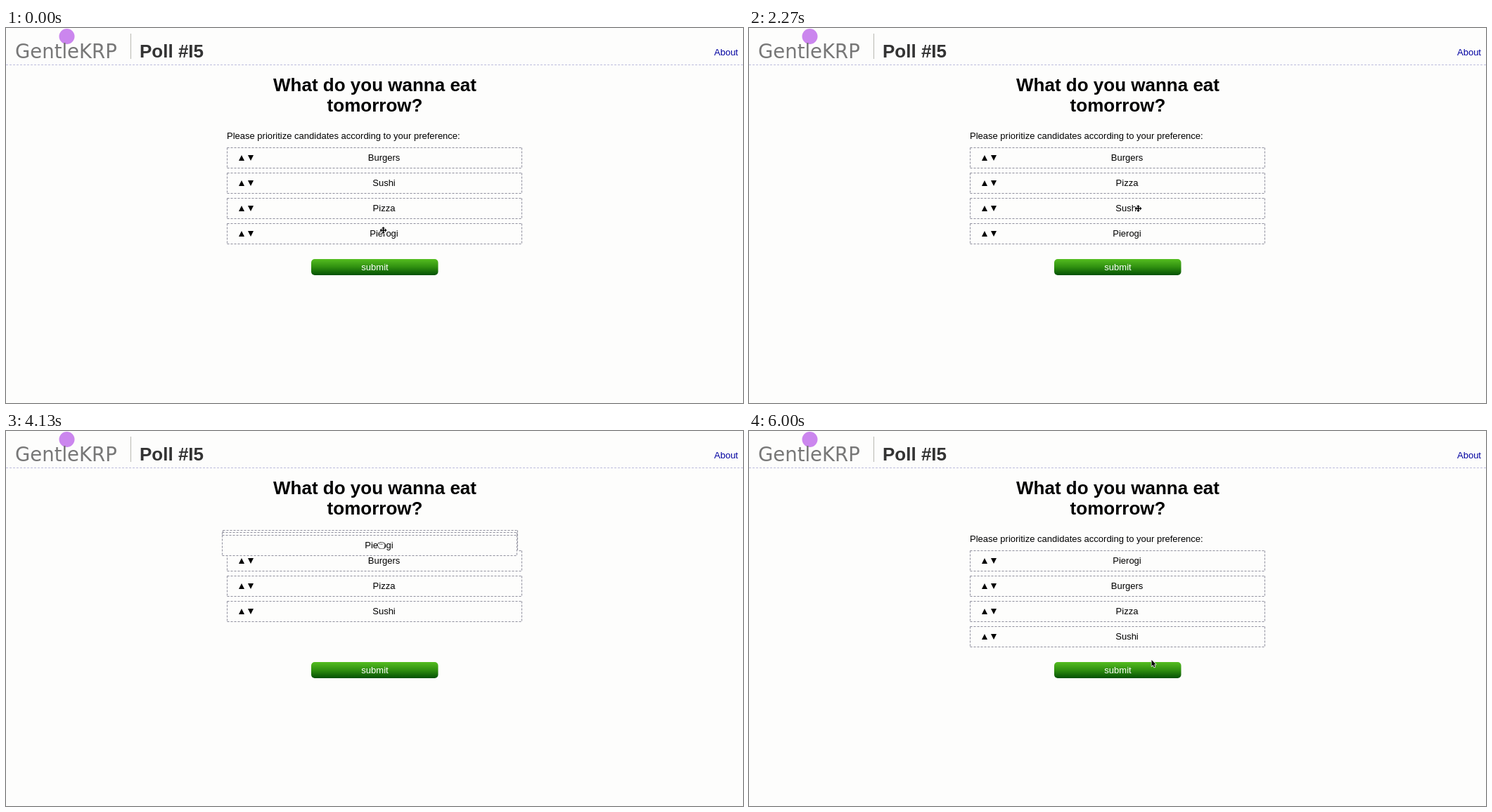
These frames come from a looping animation (1048x534 px, 8 s). An HTML page with a canvas:

```html
<!DOCTYPE html>
<html lang="en">
<head>
<meta charset="utf-8">
<title>Poll</title>
<style>
  html, body { margin: 0; width: 100%; height: 100%; overflow: hidden; background: #fdfdfc; }
  canvas { display: block; }
</style>
</head>
<body>
<canvas id="stage" width="1048" height="534"></canvas>
<script>
const ctx = document.getElementById('stage').getContext('2d');
const LOOP = 8000, TICKS_PER_MS = 0.015;
const PAPER = '#fdfdfc', BORDER = '#8f8f9d';
const SANS = '"Liberation Sans", Arial, sans-serif';
const BODY = '13px ' + SANS, HEAD = 'bold 26px ' + SANS;
const ROW = { x: 314, y: 170, w: 419, h: 29, pitch: 36 };

// Pointer path: tick, x, y
const PATH = [
  [0, 536, 288], [2, 537, 285], [7, 542, 268], [12, 544, 259], [18, 544, 259],
  [20, 545, 247], [23, 547, 215], [25, 547, 215], [28, 550, 224], [34, 553, 257],
  [38, 541, 290], [40, 540, 293], [42, 540, 293], [44, 536, 279], [45, 533, 262],
  [46, 532, 239], [47, 532, 208], [48, 532, 184], [53, 532, 184], [54, 534, 160],
  [55, 535, 143], [56, 535, 143], [57, 535, 145], [62, 533, 163], [63, 533, 167],
  [67, 531, 182], [70, 531, 182], [77, 540, 228], [78, 540, 228], [85, 570, 335],
  [87, 574, 354], [90, 572, 326]
];

// press: hand closes, lift: card starts moving, drop: list is reordered
const DRAGS = [
  { label: 'Pizza', from: 2, to: 1, press: 15, lift: 19, drop: 25, rests: [[23, 24]] },
  { label: 'Pierogi', from: 3, to: 0, press: 40, lift: 43, drop: 63, rests: [[48, 53]] }
];

function pointerAt(tick) {
  const i = PATH.findIndex(p => p[0] >= tick);
  if (i < 0) return PATH[PATH.length - 1].slice(1);
  if (i === 0) return PATH[0].slice(1);
  const [t0, x0, y0] = PATH[i - 1], [t1, x1, y1] = PATH[i];
  const k = (tick - t0) / (t1 - t0);
  return [Math.round(x0 + (x1 - x0) * k), Math.round(y0 + (y1 - y0) * k)];
}

function text(value, x, y, font = BODY, color = '#000', align = 'left') {
  ctx.font = font;
  ctx.fillStyle = color;
  ctx.textAlign = align;
  ctx.fillText(value, x, y);
}

function line(x0, y0, x1, y1, color, dash = []) {
  ctx.strokeStyle = color;
  ctx.lineWidth = 1;
  ctx.setLineDash(dash);
  ctx.beginPath();
  ctx.moveTo(x0, y0);
  ctx.lineTo(x1, y1);
  ctx.stroke();
  ctx.setLineDash([]);
}

function polygon(points, fill) {
  ctx.beginPath();
  points.forEach(([x, y]) => ctx.lineTo(x, y));
  ctx.closePath();
  ctx.fillStyle = fill;
  ctx.fill();
}

function card(label, x, y, arrows) {
  const l = x + 0.5, t = y + 0.5, r = l + ROW.w, b = t + ROW.h;
  ctx.fillStyle = PAPER;
  ctx.fillRect(x, y, ROW.w + 1, ROW.h + 1);
  line(l, t, r, t, BORDER, [3, 2]);
  line(l, b, r, b, BORDER, [3, 2]);
  line(l, t, l, b, BORDER, [3, 2]);
  line(r, t, r, b, BORDER, [3, 2]);
  text(label, x + 223.5, y + 19, BODY, '#000', 'center');
  if (!arrows) return;
  polygon([[x + 21, y + 11], [x + 25, y + 19], [x + 17, y + 19]], '#000');
  polygon([[x + 30, y + 11], [x + 38, y + 11], [x + 34, y + 19]], '#000');
}

function page() {
  ctx.fillStyle = PAPER;
  ctx.fillRect(0, 0, 1048, 534);
  ctx.fillStyle = '#cb86ee';
  ctx.beginPath();
  ctx.arc(86.5, 12, 11, 0, Math.PI * 2);
  ctx.fill();
  text('GentleKRP', 13, 43, '27.5px "DejaVu Sans", sans-serif', '#777');
  line(177.5, 8, 177.5, 44, '#b9b9b2');
  text('Poll #I5', 190, 42, HEAD, '#333');
  text('About', 1007, 39, BODY, '#0000a0');
  line(0, 52.5, 1048, 52.5, '#bdbddd', [3, 2]);

  text('What do you wanna eat', 524.5, 90, HEAD, '#000', 'center');
  text('tomorrow?', 524.5, 119, HEAD, '#000', 'center');
  text('Please prioritize candidates according to your preference:', 314, 158);

  const green = ctx.createLinearGradient(0, 329, 0, 352);
  green.addColorStop(0, '#55bd20');
  green.addColorStop(0.5, '#2f8f10');
  green.addColorStop(1, '#045004');
  ctx.fillStyle = green;
  ctx.beginPath();
  ctx.roundRect(434, 329, 180.5, 23, 5);
  ctx.fill();
  text('submit', 524.5, 345, BODY, '#fff', 'center');
}

function listAt(tick) {
  const labels = ['Burgers', 'Sushi', 'Pizza', 'Pierogi'];
  for (const d of DRAGS) {
    if (tick >= d.drop) labels.splice(d.to, 0, labels.splice(d.from, 1)[0]);
  }
  return labels;
}

// The lifted card leaves its two previous positions on screen.
function draggedCard(drag, tick) {
  const rest = drag.rests.find(([a, b]) => tick >= a && tick <= b);
  const last = rest ? rest[0] : tick;
  const [gx, gy] = pointerAt(drag.press);
  for (let t = Math.max(drag.lift, last - 2); t <= last; t++) {
    const [x, y] = pointerAt(t);
    card(drag.label, ROW.x + x - gx, ROW.y + drag.from * ROW.pitch + y - gy, false);
  }
}

function outlined(path, fill, edge, width) {
  ctx.lineJoin = 'round';
  ctx.lineWidth = width;
  ctx.strokeStyle = edge;
  ctx.stroke(path);
  ctx.fillStyle = fill;
  ctx.fill(path);
}

const ARROW = new Path2D('M0 0V9L2 7L3.6 10.5L5 9.8L3.5 6.5H6.2Z');
const HAND = new Path2D('M-4.5 -2Q-4 -4 -2 -3.5Q-1 -5 .5 -3.8Q2 -4.8 3 -3.3Q5 -3.5 5 -1.5V1L3.5 4.5H-2L-4.5 .5Z');
const MOVE = new Path2D();
for (let i = 0; i < 4; i++) {
  const arm = new Path2D('M0 -5L2.4 -2.5H.8V.8H-.8V-2.5H-2.4Z');
  MOVE.addPath(arm, new DOMMatrix().rotate(i * 90));
}

function pointer(x, y, held) {
  const offset = y - ROW.y;
  const overRow = offset >= 0 && offset < 4 * ROW.pitch && offset % ROW.pitch <= ROW.h;
  ctx.save();
  ctx.translate(x + 0.5, y);
  if (held) {
    outlined(HAND, '#fff', '#111', 1.2);
    line(-1.5, -2.5, -1.5, -1, '#111');
    line(1, -2.5, 1, -1, '#111');
  } else if (overRow) {
    outlined(MOVE, '#000', '#fff', 1.6);
  } else {
    outlined(ARROW, '#000', '#fff', 1.4);
  }
  ctx.restore();
}

function draw(ms) {
  const tick = Math.floor((ms % LOOP + 4) * TICKS_PER_MS);
  const drag = DRAGS.find(d => tick >= d.press && tick < d.drop);
  const lifted = drag && tick >= drag.lift;
  page();
  listAt(tick).forEach((label, i) => {
    if (!lifted || i !== drag.from) card(label, ROW.x, ROW.y + i * ROW.pitch, true);
  });
  if (lifted) draggedCard(drag, tick);
  pointer(...pointerAt(tick), Boolean(drag));
}

const start = performance.now();
function loop() {
  draw(performance.now() - start);
  requestAnimationFrame(loop);
}
loop();
</script>
</body>
</html>
```
